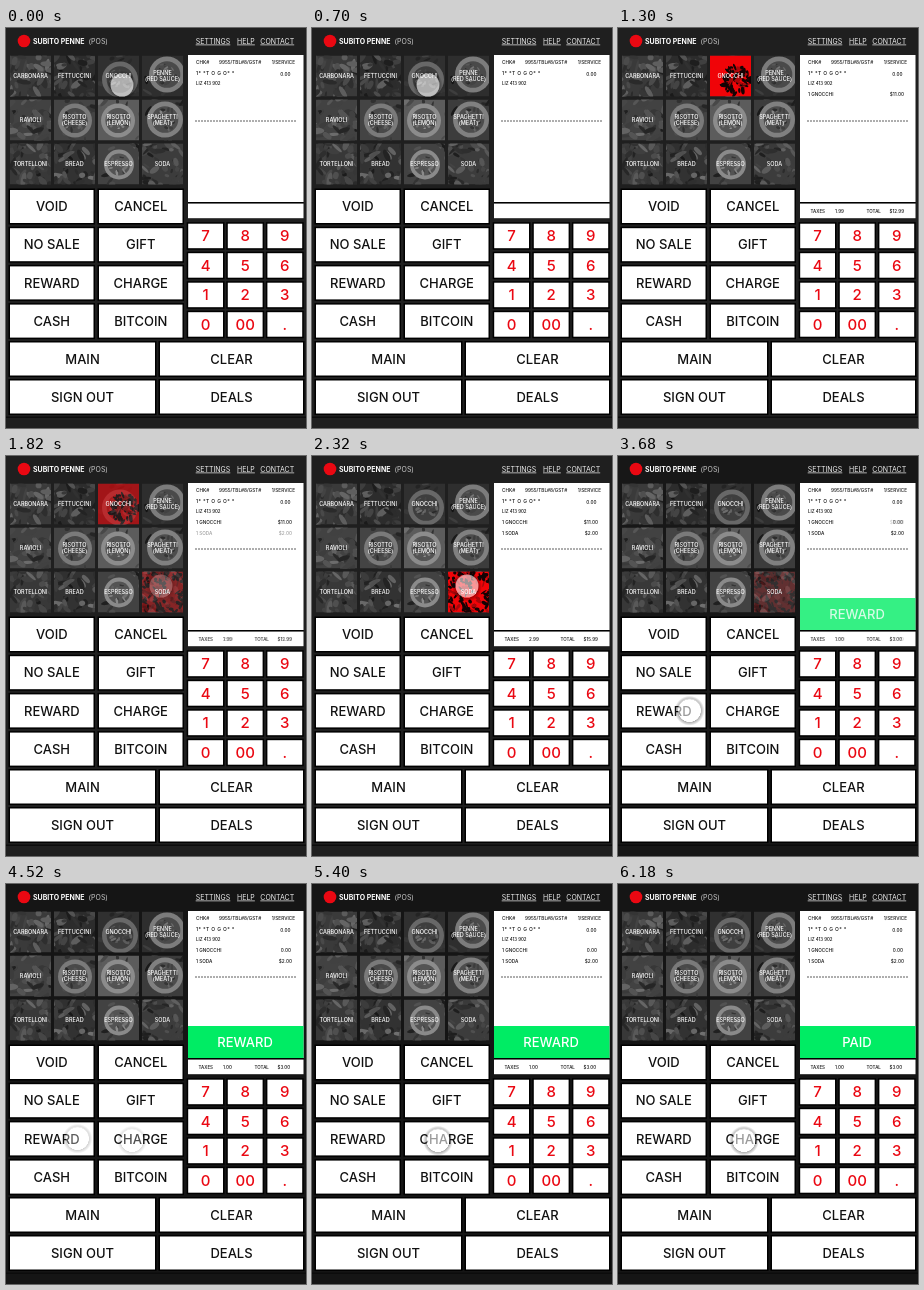
These frames come from a looping animation (300x400 px, 6200 ms). An HTML page:

```html
<!DOCTYPE html>
<html lang="en">
<head>
<meta charset="utf-8">
<title>Restaurant till</title>
<style>
html, body { margin: 0; width: 100%; height: 100%; overflow: hidden; background: #1f1f1f; }
svg {
  display: block; width: 300px; height: 400px;
  font-family: Inter, "Open Sans", sans-serif; font-feature-settings: "calt" 0;
}
.fade { animation: 6200ms infinite ease-out; }
</style>
</head>
<body>
<svg id="stage" viewBox="0 0 300 400" xmlns="http://www.w3.org/2000/svg"></svg>
<script>
const LOOP = 6200, FADE = 300;
// Start time of each screen; neighbouring screens dissolve into each other.
const SCREENS = [0, 860, 1740, 2540, 3500, 4430, 5440];
const RED = '#ea0812', GREEN = '#00ec64';
const TILE = 41, PITCH = 44;
const stage = document.getElementById('stage');
const rules = new Map();

const pct = ms => (ms / LOOP * 100).toFixed(3) + '%';

// Visible from screen `from` up to screen `to` (or the end of the loop).
function during(from, to, body) {
  const name = `s${from}-${to || 'end'}`;
  if (!rules.has(name)) {
    const a = SCREENS[from], b = SCREENS[to];
    let css = from ? `0%, ${pct(a)} {opacity: 0} ${pct(a + FADE)}` : '0%';
    css += to ? `, ${pct(b)} {opacity: 1} ${pct(b + FADE)}, 100% {opacity: 0}` : ', 100% {opacity: 1}';
    rules.set(name, `@keyframes ${name} {${css}}`);
  }
  return `<g class="fade" style="animation-name:${name}">${body}</g>`;
}

const rect = (x, y, w, h, fill, extra = '') =>
  `<rect x="${x}" y="${y}" width="${w}" height="${h}" fill="${fill}" ${extra}/>`;

// Text whose capitals are centred vertically on y.
const text = (s, x, y, size, { fill = '#111', weight = 500, anchor = 'start', extra = '' } = {}) =>
  `<text x="${x}" y="${(y + size * .364).toFixed(2)}" font-size="${size}" fill="${fill}" ` +
  `font-weight="${weight}" text-anchor="${anchor}" ${extra}>${s}</text>`;

function button(label, x, y, w, h, size = 13, fill = '#111') {
  return rect(x, y, w, h, '#fff', 'stroke="#000" stroke-width="3" paint-order="stroke"') +
    text(label, x + w / 2, y + h / 2, size, { fill, anchor: 'middle' });
}

function random(seed) {
  return () => (seed = (seed * 16807) % 2147483647) / 2147483647;
}

const gray = v => `rgb(${v},${v},${v})`;

// Dish name, ground tone, plate tone, plate centre and radius (0: no plate).
const DISHES = [
  ['CARBONARA', 58, 88, 20, 20, 0],
  ['FETTUCCINI', 44, 80, 20, 20, 0],
  ['GNOCCHI', 48, 104, 22, 24, 18],
  ['PENNE|(RED SAUCE)', 46, 124, 25, 19, 18],
  ['RAVIOLI', 66, 92, 20, 20, 0],
  ['RISOTTO|(CHEESE)', 68, 122, 21, 21, 17],
  ['RISOTTO|(LEMON)', 92, 140, 20, 21, 17],
  ['SPAGHETTI|(MEAT)', 60, 128, 23, 20, 18],
  ['TORTELLONI', 56, 86, 20, 20, 0],
  ['BREAD', 50, 96, 20, 20, 0],
  ['ESPRESSO', 66, 138, 21, 21, 15],
  ['SODA', 60, 84, 20, 20, 0]
];
const tileX = i => 4 + i % 4 * PITCH;
const tileY = i => 27.5 + Math.floor(i / 4) * PITCH;

function blobs(rand, count, cx, cy, spread, size, color) {
  let out = '';
  for (let i = 0; i < count; i++) {
    const a = rand() * Math.PI * 2, d = Math.sqrt(rand()) * spread;
    const x = (cx + Math.cos(a) * d).toFixed(1), y = (cy + Math.sin(a) * d).toFixed(1);
    const rx = (size * (.5 + rand())).toFixed(1), ry = (size * (.25 + rand() * .4)).toFixed(1);
    out += `<ellipse cx="${x}" cy="${y}" rx="${rx}" ry="${ry}" fill="${color(rand())}" ` +
      `transform="rotate(${Math.round(rand() * 180)} ${x} ${y})"/>`;
  }
  return out;
}

const clipped = (i, body) =>
  `<g transform="translate(${tileX(i)} ${tileY(i)})" clip-path="url(#tile)">${body}</g>`;

function label(i) {
  const lines = DISHES[i][0].split('|');
  return lines.map((s, n) => text(s, tileX(i) + 20.5, tileY(i) + 20.5 + (n - (lines.length - 1) / 2) * 6.4, 5.5,
    { fill: '#fff', anchor: 'middle' })).join('');
}

function tile(i) {
  const [, ground, plate, cx, cy, r] = DISHES[i];
  const rand = random(i * 977 + 31);
  const shade = tone => v => gray(Math.round(tone * (.4 + v)));
  const disc = (radius, tone) => `<circle cx="${cx}" cy="${cy}" r="${radius}" fill="${gray(tone)}"/>`;
  const food = r
    ? disc(r, plate) + disc(r * .74, Math.round(plate * .6)) + blobs(rand, 24, cx, cy, r * .62, 2.4, shade(plate * .75))
    : blobs(rand, 40, cx, cy, 28, 5, shade(plate * .85));
  return clipped(i, rect(0, 0, TILE, TILE, gray(ground)) + blobs(rand, 16, 20, 20, 28, 4, shade(ground)) + food);
}

function redTile(i, count, cx, cy, spread) {
  return clipped(i, rect(0, 0, TILE, TILE, '#f00408') +
    blobs(random(i * 331 + 7), count, cx, cy, spread, 2.8, v => v < .75 ? '#140304' : '#a8070a')) + label(i);
}

const pointer = (x, y) =>
  `<g transform="translate(${x} ${y})"><circle cy=".7" r="15" fill="url(#halo)"/>` +
  '<circle r="11.5" fill="#fff" fill-opacity=".58"/></g>';

const small = (s, x, y, anchor = 'start', size = 4.7, extra = '') => text(s, x, y, size, { anchor, extra });

const totals = (tax, sum) =>
  [['TAXES', 192.5], [tax, 217], ['TOTAL', 248.5], [sum, 271.5]].map(([s, x]) => small(s, x, 183, 'start', 4.5)).join('');

const banner = s => text(s, 239, 158, 13, { fill: '#fff', anchor: 'middle' });

function header() {
  const link = (s, x) => text(s, x, 13, 7, { fill: '#eee', weight: 400, extra: 'text-decoration="underline"' });
  return `<circle cx="18" cy="13" r="6.3" fill="${RED}"/>` +
    text('SUBITO PENNE', 27, 13, 7, { fill: '#fff', weight: 700 }) +
    text('(POS)', 82.5, 13, 7, { fill: '#ccc', weight: 400 }) +
    link('SETTINGS', 189.7) + link('HELP', 231) + link('CONTACT', 254.3);
}

function receipt() {
  return rect(182, 27, 115.5, 147, '#fff') + rect(182, 174, 115.5, 1.6, '#000') +
    rect(182, 175.6, 115.5, 14.6, '#fff') +
    small('CHK#', 190, 34) + small('9955/TBL#8/GST#', 213, 34) + small('1/SERVICE', 289, 34, 'end') +
    small('1* *T O G O* *', 190, 45, 'start', 5, 'textLength="" letter-spacing=".35"'.replace('textLength="" ', '')) +
    small('0.00', 284.5, 46, 'end') +
    small('LIZ 413 902', 190, 55.5, 'start', 4.4) +
    '<path d="M189 93H291" stroke="#333" stroke-width=".8" stroke-dasharray="2 1"/>' +
    during(1, 0, small('1 GNOCCHI', 190, 66.5)) +
    during(1, 4, small('$11.00', 286, 66.5, 'end')) +
    during(4, 0, small('0.00', 285, 66.5, 'end')) +
    during(2, 0, small('1 SODA', 190, 77.5) + small('$2.00', 286, 77.5, 'end')) +
    during(1, 2, totals('1.99', '$12.99')) +
    during(2, 4, totals('2.99', '$15.99')) +
    during(4, 0, totals('1.00', '$3.00') + rect(182, 142, 115.5, 32, GREEN)) +
    during(4, 6, banner('REWARD')) +
    during(6, 0, banner('PAID'));
}

function buttons() {
  const actions = ['VOID', 'CANCEL', 'NO SALE', 'GIFT', 'REWARD', 'CHARGE', 'CASH', 'BITCOIN'];
  const wide = ['MAIN', 'CLEAR', 'SIGN OUT', 'DEALS'];
  const keys = ['7', '8', '9', '4', '5', '6', '1', '2', '3', '0', '00', '.'];
  const row = (i, cols) => Math.floor(i / cols);
  return actions.map((s, i) => button(s, 4 + i % 2 * 89, 162 + row(i, 2) * 38.2, 83.5, 33)).join('') +
    wide.map((s, i) => button(s, 4 + i % 2 * 150, 314.5 + row(i, 2) * 38, i % 2 ? 143 : 145, 33)).join('') +
    keys.map((s, i) => button(s, 182.2 + i % 3 * 39.6, 195.7 + row(i, 3) * 29.5, 34.8, 24.5, 15, RED)).join('');
}

stage.innerHTML =
  `<defs><clipPath id="tile"><rect width="${TILE}" height="${TILE}"/></clipPath>` +
  '<radialGradient id="halo"><stop offset=".74" stop-opacity="0"/><stop offset=".76" stop-opacity=".32"/>' +
  '<stop offset="1" stop-opacity="0"/></radialGradient></defs>' +
  rect(0, 0, 300, 400, '#1f1f1f') +
  during(4, 0, rect(0, 0, 300, 400, '#151515')) +
  rect(0, 388.5, 300, 1.5, '#0c0c0c') +
  header() +
  DISHES.map((_, i) => tile(i) + label(i)).join('') +
  during(1, 2, redTile(2, 85, 27, 25, 14)) +
  during(2, 4, redTile(11, 150, 20, 20, 28)) +
  receipt() + buttons() +
  during(0, 1, pointer(116, 57)) +
  during(2, 3, pointer(155, 130)) +
  during(3, 5, pointer(71.5, 254)) +
  during(5, 0, pointer(126, 256));

const sheet = document.createElement('style');
sheet.textContent = [...rules.values()].join('\n');
document.head.append(sheet);
</script>
</body>
</html>
```
